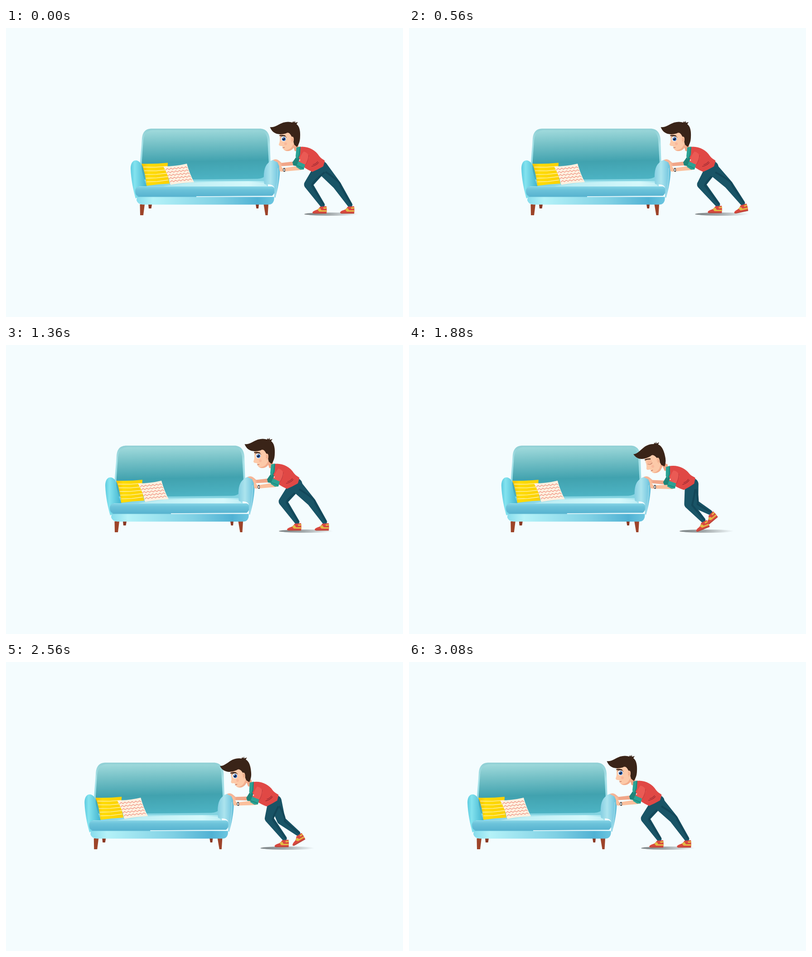
An HTML page that plays this animation: 876x639 px, repeating every 5000 ms.

```html
<!DOCTYPE html>
<html lang="en">
<head>
<meta charset="utf-8">
<title>Moving a sofa</title>
<style>
html, body { margin: 0; width: 100%; height: 100%; overflow: hidden; background: #f4fcfe; }
svg { display: block; width: 100%; height: 100%; }
</style>
</head>
<body>
<svg viewBox="0 0 876 639">
  <defs>
    <linearGradient id="back" x1="0" y1="0" x2=".06" y2="1">
      <stop offset="0" stop-color="#a0dadc"/><stop offset=".3" stop-color="#74c0c6"/>
      <stop offset=".66" stop-color="#41a2af"/><stop offset="1" stop-color="#4cb2c2"/>
    </linearGradient>
    <linearGradient id="rim" x1="0" y1="0" x2="0" y2="1">
      <stop offset="0" stop-color="#8fcfd4"/><stop offset=".3" stop-color="#a9e2e8"/><stop offset="1" stop-color="#80d2e0"/>
    </linearGradient>
    <linearGradient id="seat">
      <stop offset="0" stop-color="#74cbdf"/><stop offset=".45" stop-color="#a9e6ef"/>
      <stop offset=".85" stop-color="#d3f8fb"/><stop offset="1" stop-color="#9fe0ec"/>
    </linearGradient>
    <linearGradient id="front" x1="0" y1="0" x2="0" y2="1">
      <stop offset="0" stop-color="#86d4e6"/><stop offset=".35" stop-color="#6cc3da"/><stop offset="1" stop-color="#58b3d0"/>
    </linearGradient>
    <linearGradient id="base">
      <stop offset="0" stop-color="#86dcec"/><stop offset=".12" stop-color="#b4f2f8"/>
      <stop offset=".6" stop-color="#7fd0e4"/><stop offset=".88" stop-color="#50b2d4"/><stop offset="1" stop-color="#6cc6e0"/>
    </linearGradient>
    <linearGradient id="armL">
      <stop offset="0" stop-color="#5ccbe0"/><stop offset=".25" stop-color="#84e3ef"/><stop offset="1" stop-color="#40b3ce"/>
    </linearGradient>
    <linearGradient id="armR">
      <stop offset="0" stop-color="#86cfe2"/><stop offset=".4" stop-color="#ace4ee"/>
      <stop offset=".75" stop-color="#84cfe4"/><stop offset="1" stop-color="#5dbbd7"/>
    </linearGradient>
    <linearGradient id="wood">
      <stop offset="0" stop-color="#9c4328"/><stop offset=".5" stop-color="#c4663f"/><stop offset="1" stop-color="#9c4229"/>
    </linearGradient>
    <linearGradient id="sun">
      <stop offset="0" stop-color="#f3bf00"/><stop offset=".25" stop-color="#ffdc08"/><stop offset="1" stop-color="#fbd000"/>
    </linearGradient>
    <linearGradient id="shade">
      <stop offset="0" stop-color="#7b8284"/><stop offset=".45" stop-color="#a2a9ab"/><stop offset="1" stop-color="#a2a9ab" stop-opacity="0"/>
    </linearGradient>
    <g id="shoe">
      <path d="M-6 1L8 0C9 6 9 12 8 16H-20C-25 16-23 11-16 9-12 8-8 5-6 1Z" fill="#d9483f"/>
      <path d="M-12 7L-8 12H8.500V9H-3L-6 4ZM1 3L8.500 2V5L2 6Z" fill="#e3bb45"/>
      <path d="M-22.500 14.500H8.500L8 16.500H-20Z" fill="#b8463a"/>
    </g>
  </defs>

  <g id="scene">
    <g id="sofa">
      <path d="M314 390H322L320.500 399H315ZM551 390H558L557 399H552.500Z" fill="#8a3823"/>
      <path d="M295.500 390H306L303 414H296ZM568.500 390H579L577.500 414H572.500Z" fill="url(#wood)"/>
      <path d="M294 341C294 310 298 275 300 244Q302 223 320 222.500H562Q580 224 582 246L585 341Z" fill="url(#rim)"/>
      <path d="M298 335C299 305 301 275 303 248Q305 228 323 226H558Q574 227 577 246L580 300Q580 333 555 333.500L400 335Z" fill="url(#back)"/>
      <path d="M300 338.500H568L578 341V354H290Z" fill="url(#seat)"/>
      <path d="M405 342Q490 338.500 568 342L578 351H340Z" fill="#d9fafb" opacity=".55"/>
      <path d="M286 371L592 370V375H286Z" fill="#5cb6d0"/>
      <path d="M420 372L592 370V374H420Z" fill="#effcfd"/>
      <path d="M289 373.500H591Q593 380 589 386 586 390.500 578 390.500H302Q291 390 288 381Z" fill="url(#base)"/>
      <path d="M289 293C280 291 275 299 275 311C276 336 281 359 286 377L292 372 311 349Q301 330 299 304 296 295 289 293Z" fill="url(#armL)"/>
      <path d="M294 350H586Q593 351 593 359T587 371L420 372H293Q285 371 285 361T294 350Z" fill="url(#front)"/>
      <path d="M294 350.500H586" stroke="#9bdeec" fill="none"/>
      <path d="M570 345C567 322 570 306 578 299C585 291 596 289 601 294 606 299 605 312 604 325 602 347 598 362 594 376L592 373V354Q591 347 582 346Z" fill="url(#armR)"/>
      <path d="M594 371Q600 345 600 310" stroke="#c4eff6" stroke-width="1.500" opacity=".5" fill="none"/>
      <path d="M299 300Q328 301 357 298 355 322 361 344 336 345 310 349 308 322 299 300Z" fill="url(#sun)"/>
      <path id="waves" fill="none" stroke="#fff3b4" stroke-width="1.300"/>
      <path d="M347 306Q374 306 399 300 405 322 415 341 390 342 363 347 358 325 347 306Z" fill="#fdf0e0"/>
      <path id="zigzags" fill="none" stroke="#f08f7c" stroke-width="1.200"/>
    </g>

    <ellipse id="shadow" cx="718" cy="411.500" rx="60" ry="3.500" fill="url(#shade)"/>

    <path id="farArm" fill="#f0a688"/>
    <path d="M589 292Q596 288 602 293L608 298 609 305 603 306 599 297Z" fill="#f5b496"/>

    <g id="legS"><path class="cloth" fill="#195466"/><path class="fold" fill="none" stroke="#134759" stroke-width="4"/><use href="#shoe"/></g>
    <g id="legP"><path class="cloth" fill="#195466"/><path class="fold" fill="none" stroke="#134759" stroke-width="4"/><use href="#shoe"/></g>

    <g class="torso">
      <path d="M641 284L632 297 634 304 646 306 652 290Z" fill="#1f8479"/>
      <path d="M631 252L645 258 647 274 637 272Z" fill="#eda484"/>
      <path d="M647 263C664 260 683 269 691 283 696 290 702 291 703.500 294L700 306Q688 313 676 318 664 313 655 306L646 286Z" fill="#e04845"/>
      <path d="M650 262L641 264 639 284 643 292 649 280Z" fill="#2ba294"/>
      <path d="M649 264L647 281 643 291" fill="none" stroke="#187c72" stroke-width="1.500"/>
      <path d="M674 306Q685 304 690 297M677 302Q684 301 688 295" fill="none" stroke="#8e2630" stroke-width="1.200"/>
      <g id="head">
        <path d="M604 230C603 243 606 249 602 257 602 261 606 261 609 261L611 264 612 268C617 274 626 273 632 268L640 259 644 240 628 224Z" fill="#fcc9a8"/>
        <path d="M614 270Q624 271 630 264L637 253 639 260 632 268Q624 275 614 270Z" fill="#f2ad8c"/>
        <path d="M610 265L615 264" stroke="#b6614e" stroke-width="1.200"/>
        <circle cx="617" cy="256" r="3" fill="#f6ad93" opacity=".6"/>
        <path d="M582.500 219C592 221 601 213 612 209Q623 206 632 209L634 206 635.500 209 638 205 638 209.500 644 208 641 212.500Q650 219 649 240 649 254 642 263L636 258 632 243 628 236Q623 229 618 233 600 238 590 230 585 226 582.500 219Z" fill="#3a2418"/>
        <path d="M629 241Q635 238 635 246T631 254Q627 250 629 241Z" fill="#fac09d"/>
        <path d="M631 244Q634 246 631 250" fill="none" stroke="#d98b70"/>
        <g id="eye">
          <ellipse cx="612.500" cy="245" rx="5.500" ry="6" fill="#fff"/>
          <circle cx="613" cy="245.500" r="4.300" fill="#2d62b0"/>
          <circle cx="612.500" cy="245.500" r="2.500" fill="#10203f"/>
          <circle cx="611.500" cy="243.500" r="1.100" fill="#fff"/>
          <path d="M606 241Q613 236 619 242" fill="none" stroke="#4a2a20"/>
        </g>
        <g id="lid">
          <ellipse cx="612.500" cy="245" rx="5.500" ry="6" fill="#f7bb9b"/>
          <path d="M607 248Q612 252.500 618 248" fill="none" stroke="#b9745c"/>
        </g>
        <path d="M603 237Q610 235 617 238L616 240Q609 238 604 239Z" fill="#3a2418"/>
      </g>
    </g>

    <path id="nearArm" fill="#fbc09d"/>
    <path d="M601 296Q605 298 606 304L611 311 611 317 604 317Q602 310 603 303Z" fill="#fbc09d"/>
    <path d="M612 309.500L615.500 309.500 616 318 612.500 318Z" fill="#4b5157"/>
    <circle cx="613.500" cy="314" r="2.400" fill="#dfe6e8" stroke="#4b5157"/>

    <g class="torso">
      <path d="M657 273Q668 276 669 287L660 305 644 300Q649 282 657 273Z" fill="#ea5a54"/>
      <path d="M668 281Q668 291 660 304" fill="none" stroke="#b93439" stroke-width="1"/>
      <path d="M645 295L660 302 657 313 649 313 640 307Z" fill="#2ba294"/>
      <path d="M641 304L657 310" stroke="#187c72" stroke-width="1.200"/>
      <circle cx="648" cy="292" r="1.200" fill="#fff"/>
    </g>
  </g>
</svg>
<script>
const $ = id => document.getElementById(id);
const set = (el, attr, value) => el.setAttribute(attr, value);
const mix = (a, b, u) => a + (b - a) * u;
const LOOP = 5000, TICK = 40, HALF = 14;

// Each push: start time, ticks, distance covered.
const pushes = [[40, 14, 27], [840, 14, 29], [1680, 14, 35.5], [2480, 16, 54.5]];

// Legs: knee x, y, ankle x, y, foot angle.
const wide = [[667, 346, 699, 394, 0], [730, 347, 760, 394, 0]];
const heel = [[672, 346, 709, 393, 0], [732, 346, 764, 390, -12]];
// Between strides: time in ticks, lean, planted leg, swinging leg.
const stride = [
  [2.6, 5, [682, 346, 717, 393, 0], [709, 350, 747, 382, -30]],
  [4, 7, [686, 347, 722, 393, -2], [704, 350, 741, 377, -36]],
  [6, 10, [688, 352, 721, 390, -22], [700, 350, 736, 373, -40]],
  [10, 5, [711, 352, 743, 389, -18], [676, 344, 709, 381, -12]]
];
const path = (from, to) => [[0, 0, ...from], ...stride, [HALF, 0, to[1], to[0]]];
const halves = [path(wide, heel), path(heel, wide)];

function poseAt(keys, s) {
  let i = 1;
  while (i < keys.length - 1 && s > keys[i][0]) i++;
  const a = keys[i - 1], b = keys[i], u = (s - a[0]) / (b[0] - a[0]);
  const blend = k => a[k].map((v, j) => mix(v, b[k][j], u));
  return { lean: mix(a[1], b[1], u), planted: blend(2), swing: blend(3) };
}

// Tapered bar with round ends.
function taper(x1, y1, r1, x2, y2, r2) {
  const d = Math.hypot(x2 - x1, y2 - y1), nx = (y1 - y2) / d, ny = (x2 - x1) / d;
  const p = (x, y, r) => (x + nx * r).toFixed(2) + " " + (y + ny * r).toFixed(2);
  return `M${p(x1, y1, r1)}L${p(x2, y2, r2)}A${r2} ${r2} 0 0 0 ${p(x2, y2, -r2)}L${p(x1, y1, -r1)}A${r1} ${r1} 0 0 0 ${p(x1, y1, r1)}Z`;
}

function drawLeg(id, hx, hy, [kx, ky, ax, ay, turn]) {
  const [cloth, fold, shoe] = $(id).children;
  set(cloth, "d", taper(hx, hy, 14, kx, ky, 9.5) + taper(kx, ky, 9.5, ax - 1, ay - 3, 5.5));
  set(fold, "d", `M${hx + 9} ${hy + 10}Q${kx + 10} ${ky - 6} ${kx + 8} ${ky + 2}L${ax + 2} ${ay - 3}`);
  set(shoe, "transform", `translate(${ax} ${ay}) rotate(${turn})`);
}

const waist = [705, 300], neck = [640, 262];
function tilted(x, y, deg) {
  const a = -deg * Math.PI / 180, c = Math.cos(a), s = Math.sin(a);
  const dx = x - waist[0], dy = y - waist[1];
  return [waist[0] + dx * c - dy * s, waist[1] + dx * s + dy * c];
}

// Rows of small waves across a four-cornered cushion.
function rows(id, [a, b, c, d], count, peaks, amp) {
  let out = "";
  for (let r = 1; r <= count; r++) {
    const v = r / (count + 1);
    for (let i = 0; i <= peaks; i++) {
      const u = mix(0.03, 0.97, i / peaks);
      const at = k => mix(mix(a[k], b[k], u), mix(d[k], c[k], u), v);
      out += (i ? "L" : "M") + at(0).toFixed(1) + " " + (at(1) + (i % 2 ? -amp : amp)).toFixed(1);
    }
  }
  set($(id), "d", out);
}
rows("waves", [[300, 300], [357, 299], [360, 344], [310, 349]], 5, 2, -0.6);
rows("zigzags", [[348, 306], [399, 301], [414, 341], [363, 346]], 5, 12, 1.5);

function draw(time) {
  const t = time % LOOP;
  let shift = 0, half = 0, s = 0;
  pushes.forEach(([start, ticks, dist], i) => {
    const n = Math.min(ticks, Math.floor((t - start + 1) / TICK) + 1);
    if (n <= 0) return;
    shift += dist * n / ticks;
    half = i % 2;
    s = HALF * n / ticks;
  });
  const { lean, planted, swing } = poseAt(halves[half], s);
  const tilt = lean / 2;
  set($("scene"), "transform", `translate(${-shift} 0)`);
  set($("shadow"), "transform", `translate(${lean} 0)`);
  drawLeg("legS", 696, 308, swing);
  drawLeg("legP", 694, 309, planted);
  document.querySelectorAll(".torso").forEach(g => set(g, "transform", `rotate(${-tilt} ${waist})`));
  set($("head"), "transform", `translate(${-0.4 * lean} 0) rotate(${-lean} ${neck})`);
  set($("farArm"), "d", taper(...tilted(641, 299, tilt), 4.5, 606, 302, 3.5));
  set($("nearArm"), "d", taper(...tilted(651, 309, tilt), 5, 609, 314, 3.5));
  const closed = half === 0 && s >= 5 && s <= 8;
  set($("eye"), "display", closed ? "none" : "inline");
  set($("lid"), "display", closed ? "inline" : "none");
}

const begin = performance.now();
function loop() {
  draw(performance.now() - begin);
  requestAnimationFrame(loop);
}
draw(0);
requestAnimationFrame(loop);
</script>
</body>
</html>
```
